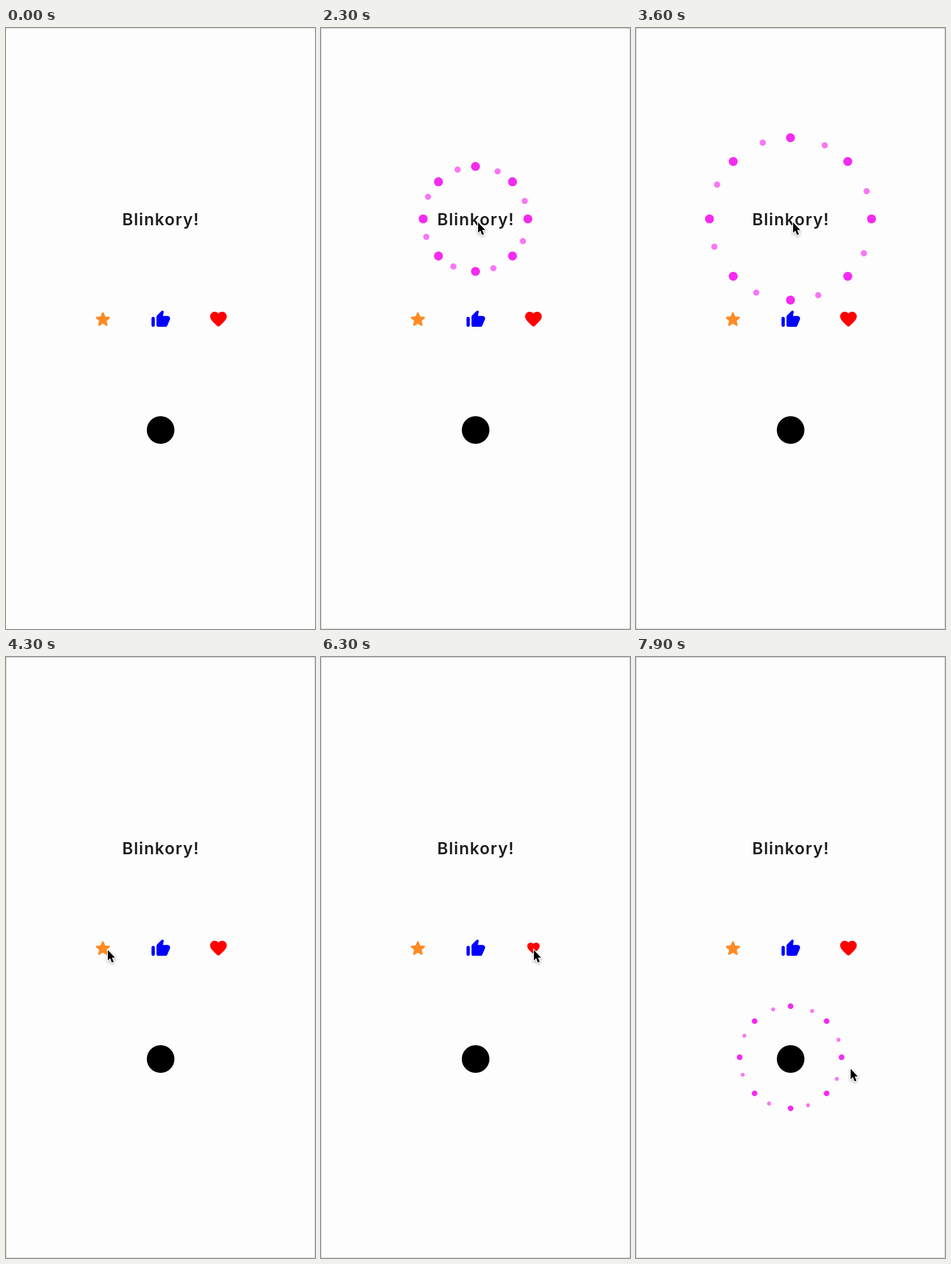
Animation of 537 by 1042 pixels, one loop 8 s. Source, as an HTML page with a canvas:

```html
<!DOCTYPE html>
<html lang="en">
<head>
<meta charset="utf-8">
<title>Burst buttons</title>
<style>
  html, body { margin: 0; width: 100%; height: 100%; overflow: hidden; background: #fdfdfd; }
  canvas { position: absolute; left: 0; top: 0; }
  #title {
    position: absolute; left: 0; top: 312px; width: 537px; height: 40px;
    text-align: center; white-space: nowrap; color: #1f1f1f;
    font: 600 28.5px/40px Inter, sans-serif; letter-spacing: 1.4px; text-indent: 1.4px;
  }
</style>
</head>
<body>
<div id="title">Blinkory!</div>
<canvas id="stage" width="537" height="1042"></canvas>
<script>
const LOOP = 8000, STEP = 100, W = 537, H = 1042;
const ctx = document.getElementById('stage').getContext('2d');
const title = document.getElementById('title');

const STAR = new Path2D('M12 17.27l4.15 2.51c.76.46 1.69-.22 1.49-1.08l-1.1-4.72 3.67-3.18c.67-.58.31-1.68-.57-1.75l-4.83-.41-1.89-4.46c-.34-.81-1.5-.81-1.84 0L9.19 8.63l-4.83.41c-.88.07-1.24 1.17-.57 1.75l3.67 3.18-1.1 4.72c-.2.86.73 1.54 1.49 1.08z');
const THUMB = new Path2D('M13.12 2.06L7.58 7.6c-.37.37-.58.88-.58 1.41V19c0 1.1.9 2 2 2h9c.8 0 1.52-.48 1.84-1.21l3.26-7.61C23.94 10.2 22.49 8 20.34 8h-5.65l.95-4.58c.1-.5-.05-1.01-.41-1.37-.59-.58-1.53-.58-2.11.01zM3 21c1.1 0 2-.9 2-2v-8c0-1.1-.9-2-2-2s-2 .9-2 2v8c0 1.1.9 2 2 2z');
const HEART = new Path2D('M13.35 20.13c-.76.69-1.93.69-2.69-.01l-.11-.1C5.3 15.27 1.87 12.16 2 8.28c.06-1.7.93-3.33 2.34-4.29 2.64-1.8 5.9-.96 7.66 1.1 1.76-2.06 5.02-2.91 7.66-1.1 1.41.96 2.28 2.59 2.34 4.29.14 3.88-3.3 6.99-8.55 11.76z');
const ARROW = new Path2D('M0 0V18L4 14.3 6.9 21.7 10.1 20.4 7.1 13.2H12.4Z');
const DISC = new Path2D('M-24 0a24 24 0 1 0 48 0a24 24 0 1 0-48 0z');

// size scales the burst; clicks are press times in ms
const buttons = [
  { x: 268.5, y: 331, size: 1.59, clicks: [1900, 3000] },
  { x: 168.4, y: 505, size: .53, clicks: [4350], icon: STAR, color: '#ff8a24' },
  { x: 268.8, y: 505, size: .53, clicks: [5500], icon: THUMB, color: '#00f' },
  { x: 369.2, y: 505, size: .53, clicks: [6090], icon: HEART, color: '#f00' },
  { x: 268.7, y: 697, burstY: 694, size: 1, clicks: [7300], icon: DISC, color: '#000' }
];

// time, x, y of the pointer tip
const route = [
  [400, 68, 126], [1200, 273, 337], [3850, 273, 337], [4250, 177, 508],
  [4950, 177, 508], [5400, 270, 508], [5750, 270, 508], [6050, 370, 508],
  [6650, 370, 508], [7100, 293, 681], [7300, 276, 697], [7500, 276, 697], [7900, 373, 714]
];

const clamp = v => Math.min(1, Math.max(0, v));
const smooth = v => v * v * (3 - 2 * v);
const easeOut = v => 1 - (1 - v) ** 3;
const ramp = (t, from, to) => clamp((t - from) / (to - from));

function pressScale(b, t) {
  return b.clicks.reduce((s, c) =>
    s - .257 * (smooth(ramp(t, c, c + 150)) - smooth(ramp(t, c + 220, c + 400))), 1);
}

function dot(x, y, r, color) {
  ctx.fillStyle = color;
  ctx.beginPath();
  ctx.arc(x, y, r, 0, 7);
  ctx.fill();
}

function drawBurst(b, p) {
  const radius = 93 * b.size * easeOut(p);
  const fade = b.size * (1 - ramp(p, .7, 1));
  const cy = b.burstY || b.y;
  for (let i = 0; i < 16; i++) {
    const small = i % 2;
    const a = ((i >> 1) * 45 + (small ? 25 : 0)) * Math.PI / 180;
    dot(b.x + radius * Math.sin(a), cy - radius * Math.cos(a),
      (small ? 3.4 : 4.9) * fade, small ? '#f977f4' : '#f42bf0');
  }
}

function drawButton(b, t) {
  const s = pressScale(b, t);
  if (!b.icon) {
    title.style.transform = `scale(${s})`;
  } else {
    ctx.save();
    ctx.translate(b.x, b.y);
    ctx.scale(s, s);
    if (b.icon !== DISC) {
      ctx.scale(1.45, 1.45);
      ctx.translate(-12, -12);
    }
    ctx.fillStyle = b.color;
    ctx.fill(b.icon);
    ctx.restore();
  }
  for (const c of b.clicks) {
    const p = (t - c - 250) / 550;
    if (p > 0 && p < 1) drawBurst(b, p);
  }
}

function drawPointer(t) {
  if (t < route[0][0]) return;
  let i = 0;
  while (i < route.length - 2 && t >= route[i + 1][0]) i++;
  const [t0, x0, y0] = route[i], [t1, x1, y1] = route[i + 1];
  const k = smooth(ramp(t, t0, t1));
  ctx.save();
  ctx.translate(x0 + (x1 - x0) * k, y0 + (y1 - y0) * k);
  ctx.lineWidth = 2.6;
  ctx.strokeStyle = '#fff';
  ctx.shadowColor = 'rgba(0,0,0,.3)';
  ctx.shadowBlur = 4;
  ctx.shadowOffsetY = 2;
  ctx.stroke(ARROW);
  ctx.shadowColor = 'transparent';
  ctx.fillStyle = '#000';
  ctx.fill(ARROW);
  ctx.restore();
}

function drawFrame(t) {
  const focused = t >= 1900;
  ctx.fillStyle = focused ? '#bdbdbd' : '#d9d9d9';
  ctx.fillRect(0, 0, W, 1);
  if (!focused) return;
  ctx.fillStyle = '#d2d2d2';
  ctx.fillRect(0, 1, 1, H);
  ctx.fillRect(W - 1, 1, 1, H);
  ctx.fillRect(0, H - 1, W, 1);
}

function render(t) {
  ctx.clearRect(0, 0, W, H);
  drawFrame(t);
  buttons.forEach(b => drawButton(b, t));
  drawPointer(t);
}

const start = performance.now();
function tick() {
  const t = (performance.now() - start) % LOOP;
  render(Math.floor(t / STEP) * STEP);
  requestAnimationFrame(tick);
}
tick();
</script>
</body>
</html>
```
